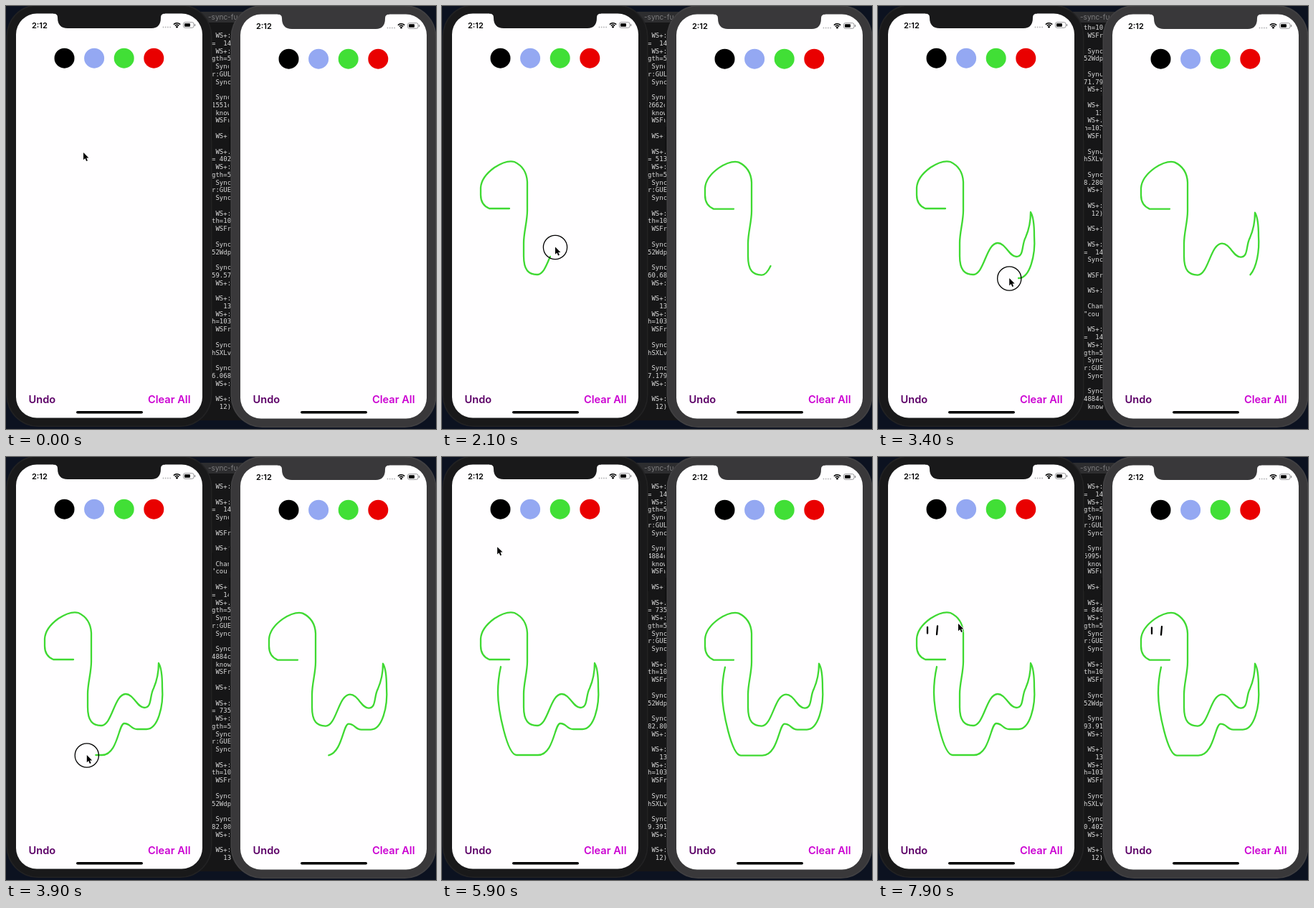
Animation, 600 px wide and 589 px high, one loop 8000 ms. Source, as an HTML page with a canvas:

```html
<!DOCTYPE html>
<html lang="en">
<head>
<meta charset="utf-8">
<style>
html, body { margin: 0; width: 100%; height: 100%; overflow: hidden; background: #0c1220; }
canvas { display: block; }
</style>
</head>
<body>
<canvas id="stage" width="600" height="589"></canvas>
<script>
const ctx = document.getElementById('stage').getContext('2d');
const LOOP = 8000, STEP = 100, ROWS = 50;
const LOCAL_LAG = 70, REMOTE_LAG = 130;
const SANS = 'Inter, "Liberation Sans", sans-serif';
const MONO = '"DejaVu Sans Mono", "Liberation Mono", monospace';

const WORM = `M94 282H66Q54 277 54 263V253Q55 238 73 225Q90 214 101 217Q118 225 119 245V285
  C119 300 114 315 114 330V348C114 368 121 374 133 374C148 374 151 330 167 330
  C178 330 183 349 193 349C204 349 200 333 206 322Q213 306 213 287Q218 295 218 320
  C220 347 212 379 196 379H183C174 379 174 371 165 371C157 371 156 415 134 415H104
  C91 415 78 352 78 328Q78 310 82 292`;

// Everything the pointer does: keys are [time, drawn length]
const strokes = [
  stroke(WORM, '#3fd932', [[500, 0], [1100, 126], [2100, 350], [2900, 478], [3900, 676], [4900, 822]]),
  stroke('M81 73h.1', 'transparent', [[5600, 0], [5725, 0]]),
  stroke('M69 237v8.5', '#000', [[6275, 0], [6500, 9]]),
  stroke('M83 235.5l-1 11.5', '#000', [[6900, 0], [7200, 12]])
];
const restStart = { time: 0, x: 108, y: 204 }, restEnd = { time: 7900, x: 112, y: 232 };

// One console session; letters stand for common rows, # for a digit, _ for a space
const SHORT = { W: ' WS+:', S: ' Sync', G: 'r:GUE', F: ' WSFr', '.': '' };
const session = ('. W . W =__14 S . F . W . _Chan "cou . W =__14 W gth=5 S G S . S ####c _know F . ' +
  'W . W =_### W gth=5 S G S . W th=10 F . S 52Wdp . S ##.## W . W ___13 ' +
  'W h=103 F . S hSXLv . S #.### W . W __12)').split(' ');
const FULL = session.length, HALF = session.indexOf('___13') + 1;
// Last visible row over time
const scroll = [[300, FULL], [1100, FULL + HALF], [2100, 2 * FULL], [2900, 3 * FULL],
  [3900, 3 * FULL + HALF], [5200, 4 * FULL], [6400, 4 * FULL], [7500, 5 * FULL]];

function stroke(d, color, keys) {
  const path = document.createElementNS('http://www.w3.org/2000/svg', 'path');
  path.setAttribute('d', d);
  return { path, color, keys, shape: new Path2D(d), start: keys[0][0], end: keys[keys.length - 1][0] };
}

function at(keys, t) {
  const i = keys.findIndex(k => k[0] > t);
  if (i === 0) return keys[0][1];
  if (i < 0) return keys[keys.length - 1][1];
  const [t0, a] = keys[i - 1], [t1, b] = keys[i];
  return a + (b - a) * (t - t0) / (t1 - t0);
}

function penAt(s, time) {
  const { x, y } = s.path.getPointAtLength(at(s.keys, time));
  return { time, x, y };
}

function logRow(n) {
  const row = session[n % FULL];
  return SHORT[row] ?? row.replaceAll('_', ' ').replace(/#/g, (_, i) => (n * 7 + i * i * 3 + i) % 10);
}

function box(x, y, w, h, r, color) {
  ctx.fillStyle = color;
  ctx.beginPath();
  ctx.roundRect(x, y, w, h, r);
  ctx.fill();
}

function disc(x, y, r, color) {
  ctx.fillStyle = color;
  ctx.beginPath();
  ctx.arc(x, y, r, 0, 7);
  ctx.fill();
}

function text(str, x, y, font, color) {
  ctx.font = font;
  ctx.fillStyle = color;
  ctx.fillText(str, x, y);
}

function terminal(t) {
  box(270, 8, 60, 569, 0, '#161617');
  box(270, 8, 60, 15, 0, '#2d2d2f');
  text('-sync-fu', 282, 19, '10px ' + SANS, '#7c7c7e');
  const first = Math.round(at(scroll, t)) - ROWS;
  for (let i = 0; i < ROWS; i++) {
    text(logRow(first + i), 287, 33.2 + i * 10.77, '9px ' + MONO, '#dcdcdc');
  }
}

function statusBar() {
  text('2:12', 36, 30.5, '600 11px ' + SANS, '#000');
  for (let i = 0; i < 4; i++) disc(219.5 + i * 3.2, 29.5, 0.9, '#b5b5b7');
  ctx.strokeStyle = '#000';
  ctx.lineWidth = 1.6;
  for (const r of [3.7, 6.3]) {
    ctx.beginPath();
    ctx.arc(238.5, 30, r, -Math.PI * 0.76, -Math.PI * 0.24);
    ctx.stroke();
  }
  disc(238.5, 29.2, 1.4, '#000');
  ctx.strokeStyle = '#8c8c8e';
  ctx.lineWidth = 0.9;
  ctx.beginPath();
  ctx.roundRect(247.5, 22.7, 14.5, 7.6, 2.3);
  ctx.stroke();
  box(249, 24.2, 8, 4.6, 1, '#000');
  box(263, 25, 1.2, 3, 0.6, '#8c8c8e');
}

function phone(dx, dy, shell, rim) {
  ctx.save();
  ctx.translate(dx, dy);
  // Side buttons
  for (const [y, h] of [[78, 18], [124, 34], [167, 35]]) box(-2, y, 5, h, 1, '#101011');
  box(284, 133, 5, 54, 1, '#101011');
  box(0.5, -2, 287, 588, 44, rim);
  box(2, -0.5, 284, 585, 43, shell);
  box(14, 10.5, 260, 563, 29, '#fffeff');

  // Notch
  ctx.fillStyle = shell;
  ctx.fill(new Path2D('M66 9V10.5Q72 10.5 72 16Q72 31 86 31H203Q216 31 216 16Q216 10.5 222 10.5V9'));

  statusBar();
  ['#000', '#94a8f2', '#41df36', '#e90000'].forEach((c, i) => disc(81.5 + i * 41.6, 72.7, 14, c));
  ctx.translate(0, -dy);
  text('Undo', 31.5, 553, '600 14.6px ' + SANS, '#5c0067');
  text('Clear All', 198, 553, '600 14.6px ' + SANS, '#cb00d2');
  box(98, 564, 93, 3.6, 1.8, '#000');
  ctx.restore();
}

function drawing(dx, dy, t) {
  ctx.save();
  ctx.translate(dx, dy);
  ctx.lineWidth = 2.3;
  ctx.lineCap = ctx.lineJoin = 'round';
  for (const s of strokes.filter(s => t > s.start)) {
    ctx.strokeStyle = s.color;
    ctx.setLineDash([at(s.keys, t), 2000]);
    ctx.stroke(s.shape);
  }
  ctx.restore();
}

// Follows the active stroke, otherwise glides from the last one to the next
function pointer(t) {
  const active = strokes.find(s => t >= s.start && t <= s.end);
  if (active) return { ...penAt(active, t), down: true };
  const last = strokes.findLast(s => s.end < t), next = strokes.find(s => s.start > t);
  const a = last ? penAt(last, last.end) : restStart;
  const b = next ? penAt(next, next.start) : restEnd;
  const f = (t - a.time) / (b.time - a.time);
  return { x: a.x + (b.x - a.x) * f, y: a.y + (b.y - a.y) * f, down: false };
}

function cursor(t) {
  const { x, y, down } = pointer(t);
  const arrow = new Path2D('M0 0V10.2L2.4 8L4.1 12L5.9 11.2L4.2 7.4H7.4Z');
  ctx.save();
  ctx.translate(x, y);
  if (down) {
    ctx.strokeStyle = '#000';
    ctx.lineWidth = 1.3;
    ctx.beginPath();
    ctx.arc(0, 0.5, 16.6, 0, 7);
    ctx.stroke();
  }
  ctx.strokeStyle = '#fff';
  ctx.lineWidth = 1.6;
  ctx.stroke(arrow);
  ctx.fillStyle = '#000';
  ctx.fill(arrow);
  ctx.restore();
}

function frame(now) {
  const t = Math.floor(now % LOOP / STEP) * STEP;
  box(0, 0, 600, 589, 0, '#0c1220');
  terminal(t);
  phone(0, 0, '#19191a', '#222223');
  phone(313, 1, '#39383a', '#414042');
  drawing(0, 0, t - LOCAL_LAG);
  drawing(313, 0.6, t - REMOTE_LAG);
  cursor(t);
  requestAnimationFrame(frame);
}
requestAnimationFrame(frame);
</script>
</body>
</html>
```
